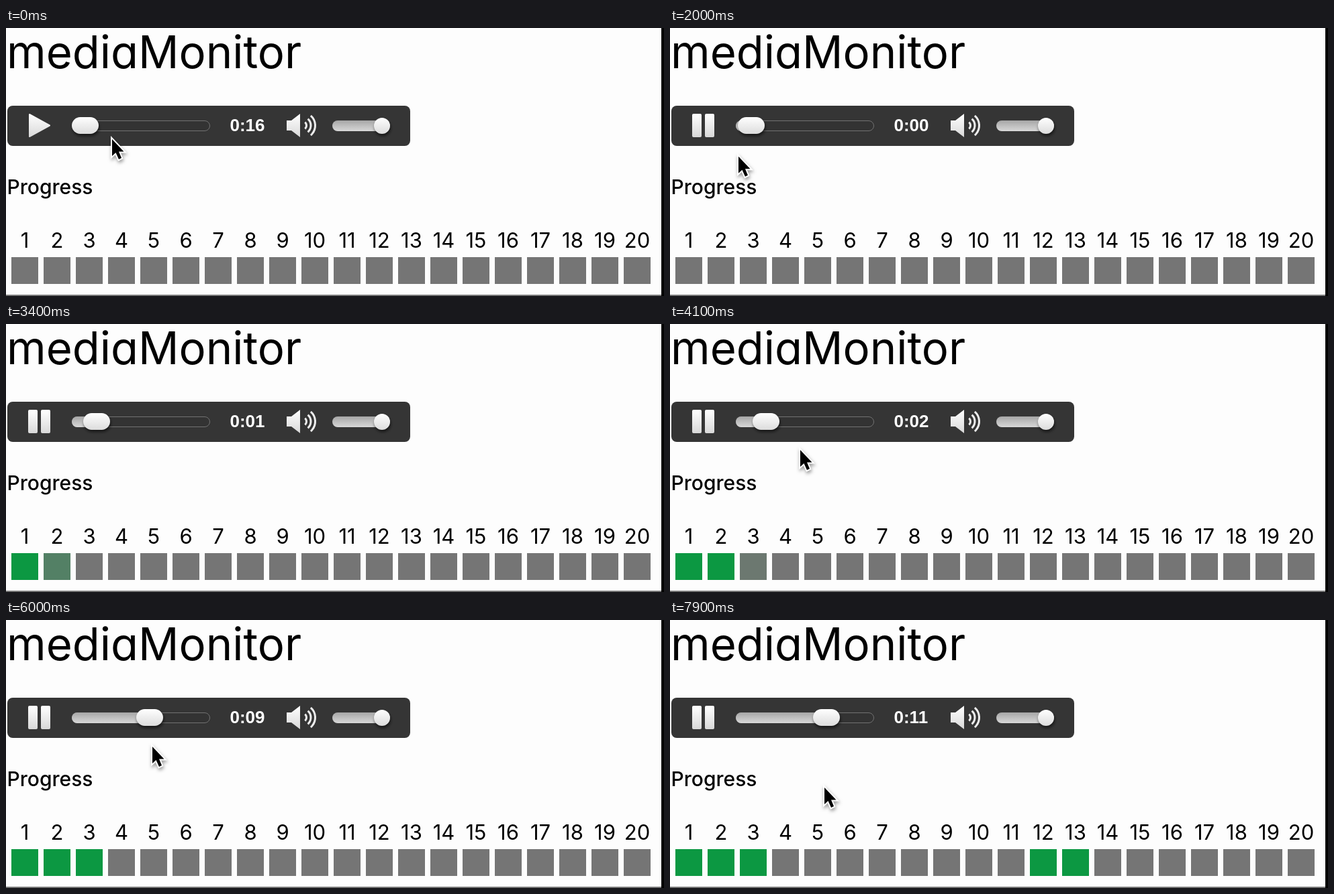
Recreate the animation shown at these times as an HTML page with a canvas. Size 980 by 400 pixels, loop 8 s.

```html
<!DOCTYPE html>
<html lang="en">
<head>
<meta charset="utf-8">
<title>mediaMonitor</title>
<style>
  html, body { margin: 0; width: 100%; height: 100%; overflow: hidden; background: #fdfdfd; }
  svg, canvas { position: absolute; left: 0; top: 0; display: block; }
  text { font-family: Inter, Lato, sans-serif; font-feature-settings: "cv11"; fill: #000; }
</style>
</head>
<body>
<svg id="labels" width="980" height="400">
  <text x="1" y="59.5" font-size="67">mediaMonitor</text>
  <text x="1.5" y="248" font-size="30" font-weight="500">Progress</text>
</svg>
<canvas id="stage" width="980" height="400"></canvas>
<script>
const ctx = document.getElementById('stage').getContext('2d');
const labels = document.getElementById('labels');
const LOOP = 8000, TICK = 100;
const CELLS = 20, DURATION = 16.1, TRAVEL = 166;
const PLAY = 1705, GRAB = 4820, DRAG = 4900, DROP = 5400;
const SEEK = 8.69;
const GRAY = [117, 117, 117], GREEN = [12, 152, 66];

// pointer stops: time, x, y
const PATH = [
  [0, 158, 166], [200, 156, 166], [1000, 43, 155], [1750, 43, 155],
  [2800, 455, 412], [3350, 400, 430], [4000, 194, 188], [4200, 194, 188],
  [4800, 161, 147], [DRAG, 161, 147], [DROP, 218, 149], [5500, 218, 149],
  [6000, 218, 189], [6500, 218, 189], [7500, 230, 250], [LOOP, 230, 250]
];

for (let i = 0; i < CELLS; i++) {
  const t = document.createElementNS('http://www.w3.org/2000/svg', 'text');
  t.setAttribute('x', 28 + 48 * i);
  t.setAttribute('y', 328);
  t.setAttribute('font-size', 31);
  t.setAttribute('text-anchor', 'middle');
  t.textContent = i + 1;
  labels.append(t);
}

const clamp = v => Math.max(0, Math.min(1, v));
const smooth = v => v * v * (3 - 2 * v);
const mix = (a, b, k) => a + (b - a) * k;
const part = (t, a, b) => smooth(clamp((t - a) / (b - a)));

function mediaTime(t) {
  if (t < PLAY) return 0;
  const held = (GRAB - PLAY) / 1000;
  if (t < GRAB) return (t - PLAY) / 1000;
  if (t < DROP) return mix(held, SEEK, part(t, DRAG, DROP));
  return SEEK + (t - DROP) / 1000;
}

// a cell lights up once its stretch has been played through
function cellLevel(i, t) {
  const due = (i + 1) * DURATION / CELLS - 0.06;
  const held = (GRAB - PLAY) / 1000;
  let at = Infinity;
  if (due < held) at = PLAY + due * 1000;
  else if (due > SEEK + 0.25) at = DROP + (due - SEEK) * 1000;
  return clamp((t - at) / 450);
}

function pointerAt(t) {
  let i = 0;
  while (i < PATH.length - 2 && t >= PATH[i + 1][0]) i++;
  const a = PATH[i], b = PATH[i + 1], k = part(t, a[0], b[0]);
  return [mix(a[1], b[1], k), mix(a[2], b[2], k)];
}

function fade(y0, y1, top, bottom) {
  const g = ctx.createLinearGradient(0, y0, 0, y1);
  g.addColorStop(0, top);
  g.addColorStop(1, bottom);
  return g;
}

function pill(x, y, w, h, r, fill) {
  ctx.beginPath();
  ctx.roundRect(x, y, w, h, r);
  ctx.fillStyle = fill;
  ctx.fill();
}

function poly(points) {
  ctx.beginPath();
  points.forEach(([x, y]) => ctx.lineTo(x, y));
  ctx.closePath();
}

function shadow(color, blur, dx, dy) {
  ctx.shadowColor = color;
  ctx.shadowBlur = blur;
  ctx.shadowOffsetX = dx;
  ctx.shadowOffsetY = dy;
}

function knob(x, y, w, h) {
  ctx.save();
  shadow('rgba(0,0,0,.6)', 4, 1, 3);
  pill(x, y, w, h, h / 2, fade(y, y + h, '#fff', '#dcdcdc'));
  ctx.restore();
}

function player(t, s) {
  const light = fade(128, 163, '#fff', '#d8d8d8');
  const bar = fade(138, 154, '#a6a6a6', '#d8d8d8');
  pill(2, 116, 600, 60, 8, '#353535');

  if (t < PLAY) {
    poly([[35, 129], [65, 145.5], [35, 162]]);
    ctx.fillStyle = ctx.strokeStyle = light;
    ctx.lineWidth = 2;
    ctx.lineJoin = 'round';
    ctx.fill();
    ctx.stroke();
  } else {
    pill(33, 128, 14, 35, 2, light);
    pill(52, 128, 14, 35, 2, light);
  }

  const x = 98 + Math.round(s / DURATION * TRAVEL);
  pill(98, 138, 206, 16, 8, '#333');
  ctx.strokeStyle = '#727272';
  ctx.lineWidth = 1;
  ctx.beginPath();
  ctx.roundRect(98.5, 138.5, 205, 15, 7.5);
  ctx.stroke();
  if (x > 98) pill(98, 138, x - 98 + 20, 16, 8, bar);
  knob(x, 133, 40, 25);

  ctx.fillStyle = '#fff';
  ctx.font = 'bold 26px "Liberation Sans", Arial, sans-serif';
  const sec = t < PLAY ? 16 : Math.floor(s);
  ctx.fillText('0:' + String(sec).padStart(2, '0'), 333.5, 154);

  poly([[418, 138], [425, 138], [438, 128], [438, 163], [425, 153], [418, 153]]);
  ctx.fillStyle = light;
  ctx.fill();
  ctx.strokeStyle = '#eee';
  ctx.lineWidth = 3;
  for (const r of [6.5, 13, 19.5]) {
    ctx.beginPath();
    ctx.arc(441, 145.5, r, -0.85, 0.85);
    ctx.stroke();
  }

  pill(486, 138, 86, 16, 8, bar);
  knob(548, 134, 24, 24);
}

function pointer(x, y) {
  ctx.save();
  ctx.translate(x, y);
  poly([[0, 0], [0, 25], [5.5, 20], [10, 30], [14, 28], [10, 18.5], [17.5, 18.5]]);
  ctx.lineJoin = 'miter';
  ctx.miterLimit = 3;
  ctx.lineWidth = 4;
  ctx.strokeStyle = '#fff';
  ctx.save();
  shadow('rgba(0,0,0,.4)', 5, 1, 3);
  ctx.stroke();
  ctx.restore();
  ctx.fillStyle = '#000';
  ctx.fill();
  ctx.restore();
}

function draw(t) {
  const s = mediaTime(t);
  ctx.clearRect(0, 0, 980, 400);
  player(t, s);
  for (let i = 0; i < CELLS; i++) {
    const k = cellLevel(i, t);
    ctx.fillStyle = `rgb(${GRAY.map((c, j) => Math.round(mix(c, GREEN[j], k)))})`;
    ctx.fillRect(8 + 48 * i, 342, 40, 40);
  }
  ctx.fillStyle = '#777';
  ctx.fillRect(0, 398, 976, 2);
  ctx.fillStyle = '#000';
  ctx.fillRect(976, 0, 4, 400);
  pointer(...pointerAt(t));
}

const start = performance.now();
function frame() {
  const t = (performance.now() - start) % LOOP;
  draw(Math.floor(t / TICK) * TICK);
  requestAnimationFrame(frame);
}
frame();
</script>
</body>
</html>
```
